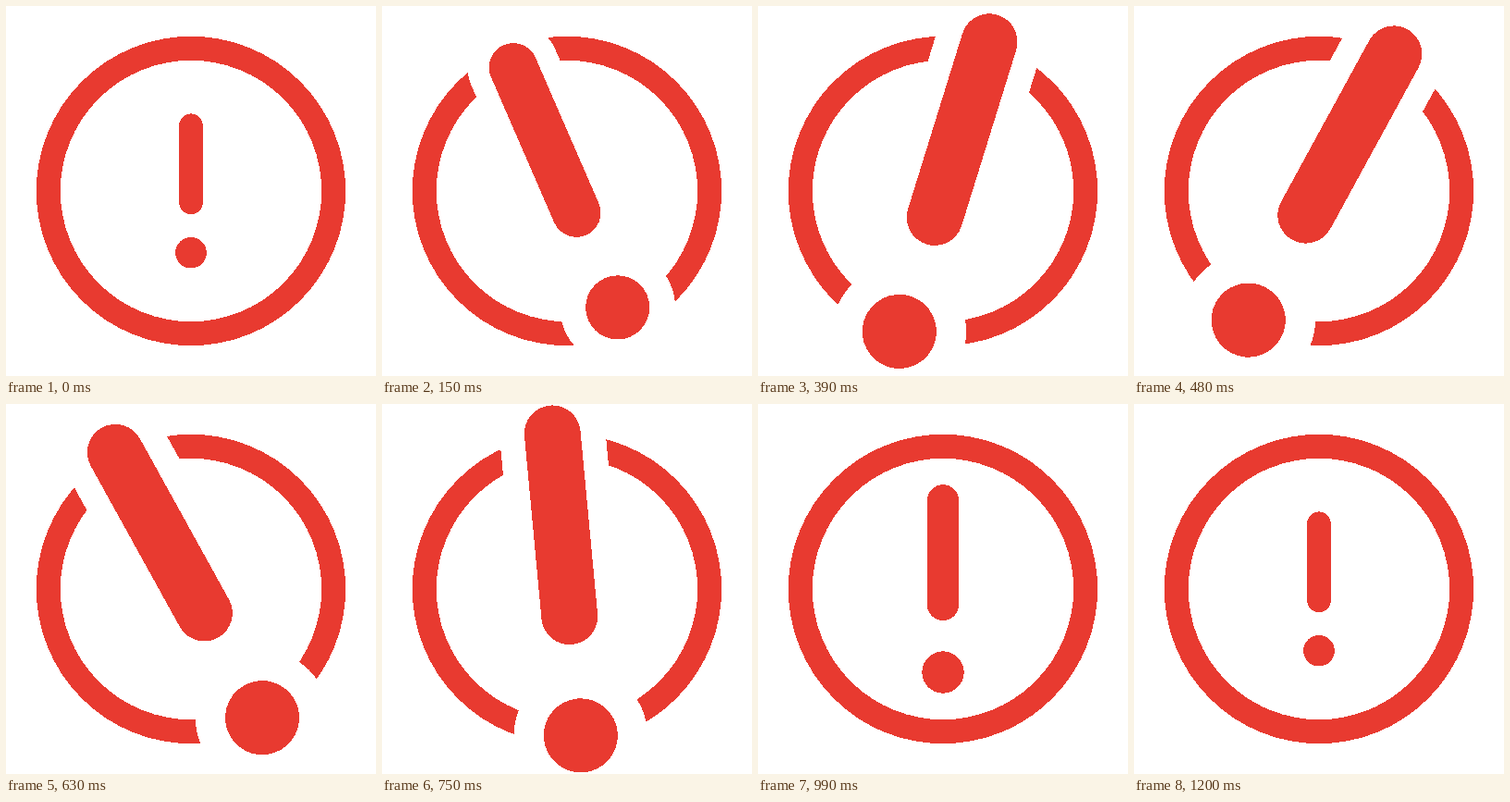
An HTML page without scripts for the animation above (3230 ms loop, 400x400 px).

```html
<!DOCTYPE html>
<html lang="en">
<head>
<meta charset="utf-8">
<title>Alert icon</title>
<style>
  html, body { margin: 0; width: 100%; height: 100%; overflow: hidden; background: #fff; }
  svg { display: block; width: 100%; height: 100%; fill: none; stroke-linecap: round; shape-rendering: crispEdges; }
  .red { stroke: #e83a30; }
  .gap { stroke: #fff; }
  .dot { stroke: none; }
  .red.dot { fill: #e83a30; }
  .gap.dot { fill: #fff; }

  .mark {
    transform-origin: 200px 200px;
    animation:
      grow 3230ms cubic-bezier(.33, 0, .26, 1) infinite,
      swing 3230ms cubic-bezier(.333, 0, .667, 1) infinite;
  }
  @keyframes grow {
    0%, 37.152%, 100% { scale: 1; }
    9.288%, 24.458% { scale: 2.385; }
  }
  @keyframes swing {
    0%, 24.458%, 100% { rotate: 0deg; }
    6.687%, 19.969% { rotate: -30deg; }
    14.396% { rotate: 30deg; }
  }
</style>
</head>
<body>
<svg viewBox="0 0 400 400">
  <circle class="red" cx="200" cy="200" r="154.16" stroke-width="26"/>
  <g class="mark">
    <!-- white margin that cuts the ring -->
    <path class="gap" d="M200 129.2V212.5" stroke-width="48"/>
    <circle class="gap dot" cx="200" cy="266.7" r="30.3"/>
    <path class="red" d="M200 129.2V212.5" stroke-width="25.5"/>
    <circle class="red dot" cx="200" cy="266.7" r="16.8"/>
  </g>
</svg>
</body>
</html>
```
